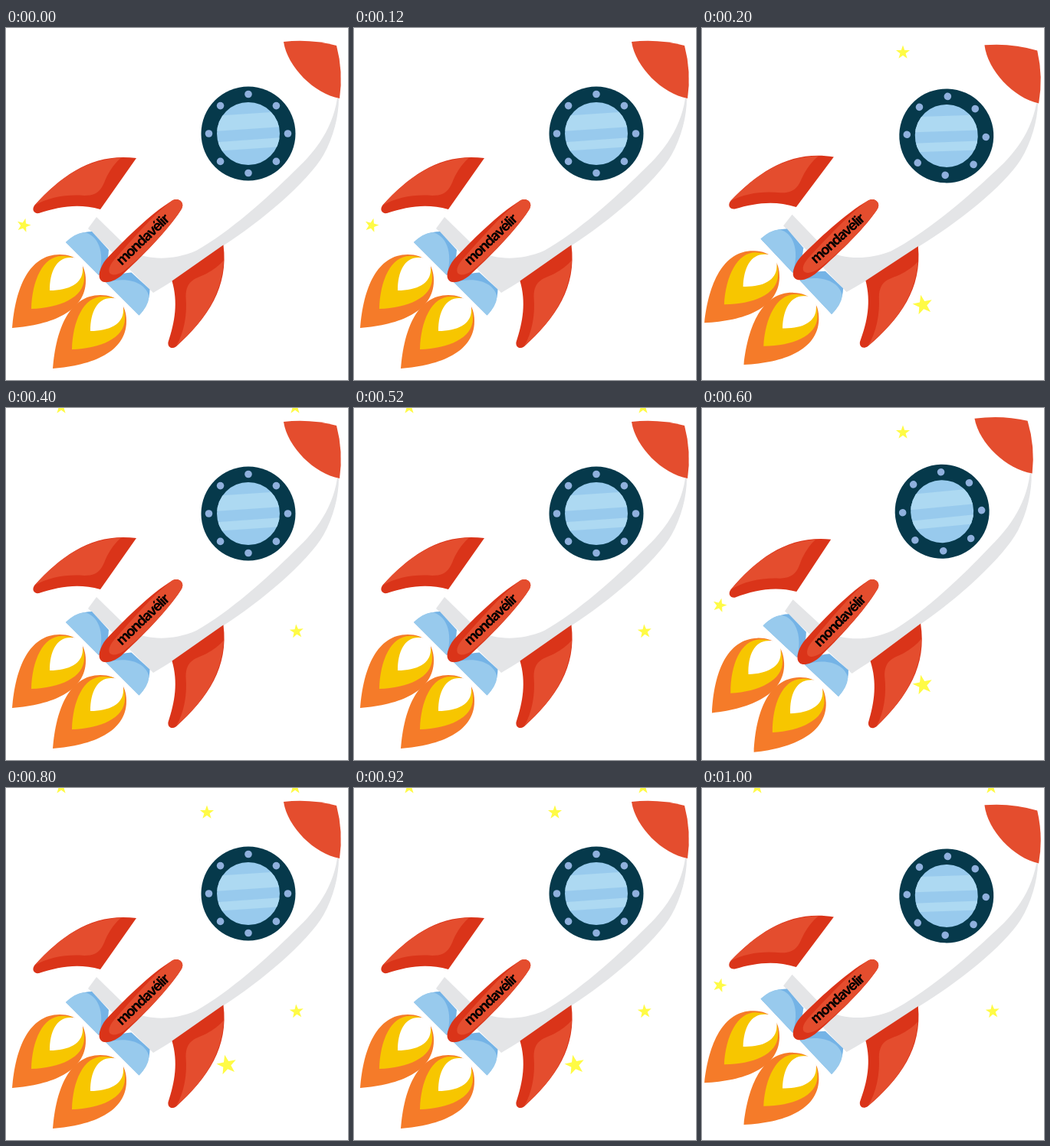
Recreate the animation shown at these times as an HTML page. Size 446 by 460 pixels, loop 1200 ms.

```html
<!DOCTYPE html>
<html lang="pt">
<head>
<meta charset="utf-8">
<title>Rocket</title>
<style>
  html, body { margin: 0; width: 100%; height: 100%; overflow: hidden; background: #fff; }
  svg { display: block; width: 100%; height: 100%; }
  .red { fill: #e44d2e; }
  .dark { fill: #da3419; }
  text { font: 700 18.5px Inter, sans-serif; letter-spacing: -1.5px; }
</style>
</head>
<body>
<svg viewBox="0 0 446 460">
  <defs>
    <clipPath id="pane"><circle cx="316" cy="138" r="41"/></clipPath>
  </defs>
  <g id="stars" fill="#fffb45"></g>
  <g id="rocket">
    <!-- hull shadow and nose -->
    <path fill="#e4e5e7" d="M432 92C425 137 398 167 374 189C342 221 291 267 248 291C215 305 185 302 165 293L118 247L107 262L192 346C230 324 270 295 284 284C332 253 393 202 414 166C427 143 434 115 434 92Z"/>
    <path class="red" d="M362 18Q397 14 431 23Q440 57 435 92C402 86 367 51 362 18Z"/>

    <!-- porthole -->
    <circle cx="316" cy="138" r="61.5" fill="#06394b"/>
    <g clip-path="url(#pane)">
      <path fill="#98caed" d="M270 90h92v92h-92z"/>
      <path fill="#add9f2" d="M270 115L362 109V129L270 135ZM270 149.500L362 143V155L270 161Z"/>
    </g>
    <g id="bolts" fill="#8fb0dd"></g>

    <!-- flames -->
    <g id="flame">
      <path fill="#f57b29" d="M8 392C12 340 30 296 70 296C92 296 104 308 104 330C104 370 60 388 8 392Z"/>
      <path fill="#f7c600" d="M33 367C34 330 48 298 73 298C92 297 103 308 102 327C102 352 70 366 33 367Z"/>
      <path fill="#fff" d="M57 343C57 318 66 300 84 300C96 299 101 304 100 316C100 334 82 343 57 343Z"/>
    </g>
    <use href="#flame" x="53" y="53"/>

    <!-- fin and nozzle, mirrored across the long axis -->
    <g id="side">
      <path class="dark" d="M170 170C115 163 75 190 37 232C33 238 37 243 43 242C70 233 95 229 123 237Z"/>
      <path class="red" d="M150 169.500C105 172 70 195 37 232C55 221 80 217 102 219C125 219 126 205 132 193Q140 178 150 169.500Z"/>
      <path fill="#74b3e6" d="M78 280Q93 266 112 266L134 290Q133 312 121 323Z"/>
      <path fill="#98caed" d="M78 280Q90 268 102 267C119 270 130 292 121 323Z"/>
    </g>
    <use href="#side" transform="matrix(0 -1 -1 0 453.5 453.5)"/>

    <!-- middle fin -->
    <path class="dark" d="M130 303C152 279 188 243 216 226C225 220 235 229 228 238C211 265 175 301 150 324C138 333 128 334 124 330C119 326 122 313 130 303Z"/>
    <path class="red" d="M141 303C163 278 191 245 216 226C225 220 235 229 228 238C211 264 178 298 153 318C145 323 138 324 135 320C133 315 136 309 141 303Z"/>
    <text transform="translate(151 311) rotate(-43.500)">mondavélir</text>
  </g>
</svg>
<script>
const STEP = 200, TILT = 1.75;
const sway = [0, 1, 0, -1, 0, 1];
const $ = id => document.getElementById(id);

function add(parent, tag, attrs) {
  const el = document.createElementNS("http://www.w3.org/2000/svg", tag);
  for (const key in attrs) el.setAttribute(key, attrs[key]);
  return parent.appendChild(el);
}

for (let i = 0; i < 8; i++) {
  const a = i * Math.PI / 4;
  add($("bolts"), "circle", { cx: 316 + 51.5 * Math.cos(a), cy: 138 + 51.5 * Math.sin(a), r: 4.8 });
}

const starPoints = (x, y, r, turn) => Array.from({ length: 10 }, (_, i) => {
  const a = (i * 36 + turn - 90) * Math.PI / 180, d = i % 2 ? r * 0.4 : r;
  return [x + d * Math.cos(a), y + d * Math.sin(a)];
}).join(" ");

// x, y, radius, turn, steps in which the star shines
const stars = [
  [23, 258, 9.5, 15, "035"],
  [262, 32, 9.5, 0, "134"],
  [288, 362, 13.5, -12, "134"],
  [72, -1, 9.5, 0, "245"],
  [377, -1, 9.5, 0, "245"],
  [379, 292, 9.5, -5, "245"]
].map(([x, y, r, turn, steps]) => ({
  el: add($("stars"), "polygon", { points: starPoints(x, y, r, turn) }),
  steps
}));

function draw(now) {
  const step = Math.floor(now / STEP) % sway.length;
  $("rocket").setAttribute("transform", `rotate(${sway[step] * TILT} 223 230)`);
  for (const { el, steps } of stars)
    el.setAttribute("visibility", steps.includes(step) ? "visible" : "hidden");
}

let start;
function tick(now) {
  start ??= now;
  draw(now - start);
  requestAnimationFrame(tick);
}
draw(0);
requestAnimationFrame(tick);
</script>
</body>
</html>
```
